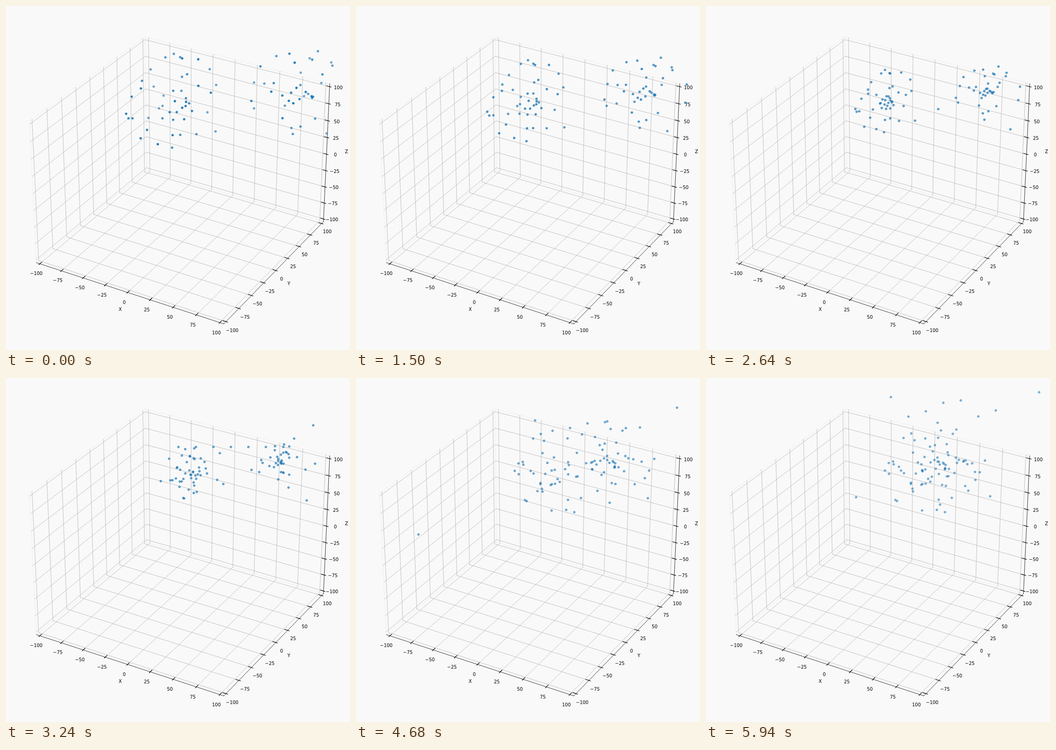
These frames come from a looping animation (748 by 748 pixels, 6 s). An HTML page with a canvas:

```html
<!DOCTYPE html>
<html lang="en">
<head>
<meta charset="utf-8">
<title>Two star clusters merging</title>
<style>
  html, body { margin: 0; width: 100%; height: 100%; overflow: hidden; background: #f9f9f9; }
  canvas { display: block; }
</style>
</head>
<body>
<canvas id="stage" width="748" height="748"></canvas>
<script>
const ctx = document.getElementById('stage').getContext('2d');
const STEP = 60, STEPS = 100;
const EDGE = 104.17, LABEL_GAP = 6.4;

// Perspective camera: elevation 30, azimuth -60, distance 10.
function project([x, y, z]) {
  x *= 0.59524 / EDGE; y *= 0.59524 / EDGE; z *= 0.44643 / EDGE;
  const scale = 3924.3 / (10 - (0.433 * x - 0.75 * y + 0.5 * z));
  return [383.8 + scale * (0.866 * x + 0.5 * y),
          364.2 - scale * (-0.25 * x + 0.433 * y + 0.866 * z)];
}

function line(color, width, ...points) {
  ctx.strokeStyle = color;
  ctx.lineWidth = width;
  ctx.beginPath();
  points.forEach(p => ctx.lineTo(...project(p)));
  ctx.stroke();
}

// Text centred on a point, set on whole pixels.
function label(text, [x, y], drop = 0) {
  ctx.fillStyle = '#000';
  ctx.fillText(text, Math.round(x - ctx.measureText(text).width / 2), Math.round(y + drop + 3.6));
}

function drawAxes() {
  const E = EDGE, G = EDGE + LABEL_GAP, out = E + 1.67, inner = E - 3.33;
  const pane = '#ececec', grid = '#b0b0b0', ink = '#000';
  ctx.font = '10px "DejaVu Sans", sans-serif';
  ctx.lineCap = 'square';

  line(pane, 0.8, [-E, -E, -E], [-E, -E, E], [-E, E, E], [E, E, E], [E, E, -E]);
  line(pane, 0.8, [-E, -E, -E], [-E, E, -E], [E, E, -E]);
  line(pane, 0.8, [-E, E, -E], [-E, E, E]);
  for (let v = -100; v <= 100; v += 25) {
    line(grid, 0.8, [v, -E, -E], [v, E, -E], [v, E, E]);
    line(grid, 0.8, [E, v, -E], [-E, v, -E], [-E, v, E]);
    line(grid, 0.8, [-E, -E, v], [-E, E, v], [E, E, v]);
  }
  line(ink, 0.8, [-E, -E, -E], [E, -E, -E]);
  line(ink, 0.8, [E, -E, -E], [E, E, -E]);
  line(ink, 0.8, [E, E, -E], [E, E, E]);
  for (let v = -100; v <= 100; v += 25) {
    const text = String(v).replace('-', '\u2212');
    line(ink, 1.2, [v, -out, -E], [v, -inner, -E]);
    line(ink, 1.2, [out, v, -E], [inner, v, -E]);
    line(ink, 1.2, [out, E, v], [inner, E, v]);
    label(text, project([v, -G, -G]), 5);
    label(text, project([G, v, -G]), 5);
    label(text, project([G, G, v]), 4);
  }
  label('X', [248, 659]);
  label('Y', [615, 603]);
  label('Z', [740, 316]);
}

let seed = 20;
function random() {
  seed = (seed * 1664525 + 1013904223) % 4294967296;
  return seed / 4294967296;
}

function scatter(radius) {
  const angle = random() * 2 * Math.PI;
  return [radius * Math.cos(angle), 0.9 * radius * Math.sin(angle)];
}

const mix = (a, b, u) => a + (b - a) * u;
const ramp = (t, from, to) => Math.min(1, Math.max(0, (t - from) / (to - from)));
const smooth = u => u * u * (3 - 2 * u);

const CLUSTERS = [
  { count: 46, from: [365, 205], to: [488, 203] },
  { count: 38, from: [637, 180], to: [520, 190] }
];
for (const c of CLUSTERS) {
  c.stars = Array.from({ length: c.count }, () => {
    const radius = 118 * random() ** 0.65;
    return {
      start: scatter(radius),
      lag: 1.6 - radius / 110,   // outer stars fall in more slowly
      rebound: scatter(105 * random() ** 1.1),
      glow: random()
    };
  });
}

// Stars on straight courses: first and last step, start point, speed per step.
const STRAYS = [
  { first: 0, last: 99, x: 697, y: 277, dx: -0.8, dy: -0.2 },
  { first: 0, last: 99, x: 648, y: 196, dx: -3.25, dy: 0.64 },
  { first: 11, last: 18, x: 362, y: 236, dx: -52, dy: 2.8 },
  { first: 54, last: 99, x: 668, y: 103, dx: 1.25, dy: -1.6 },
  { first: 62, last: 88, x: 331, y: 281, dx: -12.2, dy: 3.7 },
  { first: 85, last: 89, x: 543, y: 419, dx: 47, dy: 69.5 }
];
// Stars thrown upwards when the clusters rebound.
for (let i = 0; i < 7; i++) {
  STRAYS.push({ first: 54, last: 99, x: 375 + 38 * i, y: 150, dx: 0.6, dy: -0.8 - 1.7 * random() });
}

function dot(x, y, alpha) {
  ctx.globalAlpha = alpha;
  ctx.beginPath();
  ctx.arc(x, y, 2.236, 0, 2 * Math.PI);
  ctx.fill();
  ctx.stroke();
}

function drawStars(t) {
  const drift = (t / 99) ** 1.9;
  const fall = 1 - ramp(t, 0, 72) ** 1.4;
  const bounce = smooth(ramp(t, 40, 80));
  const early = ramp(t, 0, 34);
  const dim = 0.52 + 0.16 * early - 0.18 * ramp(t, 34, 99);
  const contrast = mix(0.46, 0.02, early);

  ctx.save();
  ctx.beginPath();
  ctx.rect(11, 11, 726, 726);
  ctx.clip();
  ctx.fillStyle = ctx.strokeStyle = '#1f77b4';
  ctx.lineWidth = 1;
  for (const { from, to, stars } of CLUSTERS) {
    for (const { start, lag, rebound, glow } of stars) {
      const [x, y] = [0, 1].map(k =>
        mix(from[k], to[k], drift) + start[k] * fall ** lag + rebound[k] * bounce);
      dot(x, y, dim + contrast * glow);
    }
  }
  for (const { first, last, x, y, dx, dy } of STRAYS) {
    if (t >= first && t <= last) dot(x + dx * (t - first), y + dy * (t - first), dim);
  }
  ctx.restore();
}

function frame() {
  ctx.fillStyle = '#f9f9f9';
  ctx.fillRect(0, 0, 748, 748);
  drawAxes();
  drawStars(Math.floor(performance.now() / STEP) % STEPS);
  requestAnimationFrame(frame);
}
frame();
</script>
</body>
</html>
```
